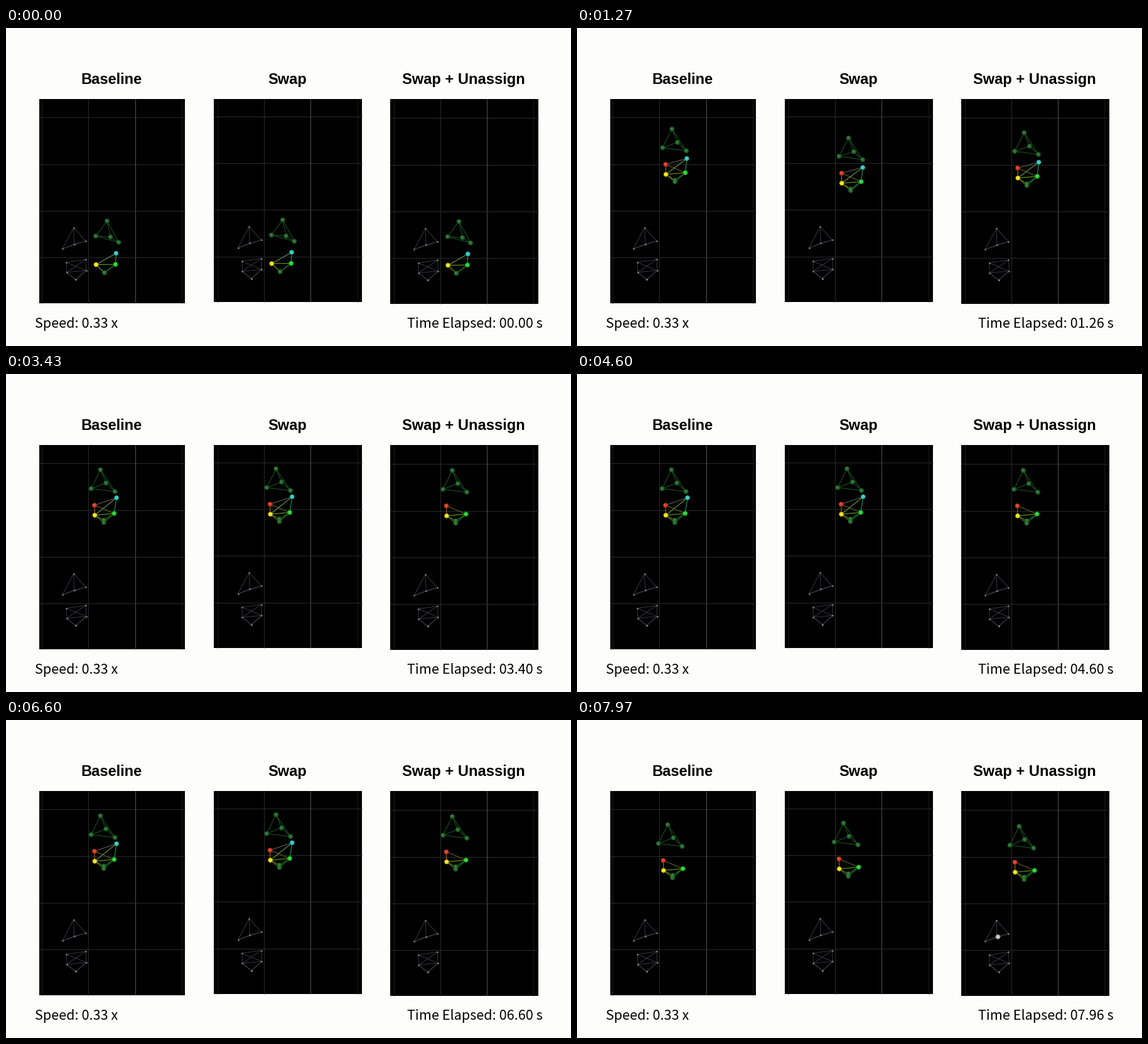
Animation of 900x506 px, one loop 8 s. Source, as a matplotlib script:

```python
from itertools import combinations

import numpy as np
import matplotlib.pyplot as plt
from matplotlib.animation import FuncAnimation
from matplotlib.collections import LineCollection
from matplotlib.patches import Rectangle

W, H, DPI = 900, 506, 128
PT = 72 / DPI
FPS, LOOP = 30, 8000
N = LOOP * FPS // 1000

# Panels: title, box, shift of the scene, duration of the rise, size of the fall
PANELS = [
    ("Baseline", (52.5, 113, 284.5, 437.5), (0, 0), 1475, 1.0),
    ("Swap", (331, 113, 567, 436), (279.7, -1.6), 1690, 0.94),
    ("Swap + Unassign", (612, 113, 847.5, 438.5), (560.5, 1), 1545, 1.12),
]
CELL = 74.3

# Head seen from its apex: apex, left, middle, right
HEAD = np.array([(0, 0), (-18, 24), (5.5, 25.5), (18.5, 34)])
HEAD_TURNED = np.array([(0, 0), (-14.8, 30), (8.8, 21), (23.1, 34.6)])
HEAD_REST = np.array([(0, 0), (-17.9, 33.5), (0.8, 26.2), (19.1, 21.2)])
# Body seen from its yellow node: red, yellow, cyan, green, two dark ones
BODY = np.array([(0.8, -15.9), (0, 0), (31.8, -18), (31, -0.4), (13.4, 12.8), (13.4, 12.8)])
RED, CYAN, UPPER_DARK = 4, 6, 8
EDGES = (list(combinations(range(4), 2)) + list(combinations(range(4, 8), 2))
         + [(a, b) for a in (5, 7) for b in (8, 9)])

DARK = (36, 112, 44)
COLORS = np.array([DARK] * 4 + [(226, 60, 36), (246, 230, 30), (52, 206, 200),
                                (36, 220, 52), DARK, DARK]) / 255

fig = plt.figure(figsize=(W / DPI, H / DPI), dpi=DPI, facecolor="#fdfdfb")
ax = fig.add_axes([0, 0, 1, 1])
ax.set_xlim(0, W)
ax.set_ylim(H, 0)
ax.axis("off")


def ease(t, start, length):
    u = np.clip((t - start) / length, 0, 1)
    return u * u * (3 - 2 * u)


def turn(points, degrees):
    a = np.radians(degrees)
    c, s = np.cos(a), np.sin(a)
    return points @ np.array([(c, s), (-s, c)])


def label(x, y, text, px, font, **style):
    return ax.text(x, y, text, fontsize=px * PT, family=font, va="baseline",
                   color="black", **style)


def rule(xs, ys, shade):
    ax.plot(xs, ys, color=shade, lw=PT, solid_capstyle="butt")


REST = np.vstack([HEAD_REST + (107.7, 317.8), turn(BODY, -4.5) + (96.7, 388.7)])

for title, (x0, y0, x1, y1), (dx, dy), *_ in PANELS:
    ax.add_patch(Rectangle((x0, y0), x1 - x0, y1 - y0, fc="black", lw=0))
    for k in range(4):
        x, y = 57 + k * CELL + dx, 142.3 + k * CELL + dy
        rule([x, x], [y0, y1], ("#1b1b1c", "#2a2a2a", "#52524e", "#1b1b1c")[k])
        rule([x0, x1], [y, y], "#2a2a2d")
    rest = REST + (dx, dy)
    ax.add_collection(LineCollection([rest[list(e)] for e in EDGES],
                                     colors="#3e3e46", linewidths=0.9 * PT))
    ax.scatter(*rest.T, s=(2.6 * PT) ** 2, color="#85857e", lw=0, zorder=3)
    label((x0 + x1) / 2 - 1, 88.5, title, 23.6, "Liberation Sans",
          ha="center", weight="bold")

label(46.5, 477, "Speed: 0.33 x", 21.6, "Noto Sans CJK JP")
clock = label(639, 477, "", 21.6, "Noto Sans CJK JP")


def figure(t, rise_ms, fall):
    """Places of all nodes: a rise, a rest, and the start of a fall."""
    r = ease(t, 0, rise_ms)
    back = fall * max(0, (t - 7470) / 500) ** 2
    head = HEAD + (HEAD_TURNED - HEAD) * r
    head = head + (161 - 10.6 * r ** 1.6 - 6 * back, 307 - 154.6 * r + 14.3 * back)
    body = turn(BODY, -4.5 * r)
    body = body + (143.5 - 2.1 * r * r - 3.6 * back, 376.5 - 151.8 * r + 14.9 * back)
    p = np.vstack([head, body])
    stray = ease(t, 900, 600) - ease(t, 7050, 420)
    p[CYAN] += np.array((4.4, -7.4)) * stray
    p[UPPER_DARK] += np.array((0.2, -4)) * ease(t, 900, 600)
    return p


def shown(t, unassign):
    on = np.ones(len(COLORS), bool)
    on[RED] = t > 200
    on[CYAN] = t < 7700 and not (unassign and 1400 < t < 7150)
    return on


def balls(px, z):
    return ax.scatter([], [], s=(px * PT) ** 2, lw=0, zorder=z)


lines = LineCollection([], linewidths=1.1 * PT, zorder=4)
ax.add_collection(lines)
rims, cores, glints = balls(7.6, 5), balls(5.8, 6), balls(2.2, 7)
WHITE = np.array([(0.8, 0.8, 0.75)])


def draw(n):
    t = n * 1000 / FPS
    segs, seg_cols, pts, cols = [], [], [], []
    for title, _, shift, rise_ms, fall in PANELS:
        unassign = "Unassign" in title
        p = figure(t, rise_ms, fall) + shift
        on = shown(t, unassign)
        for a, b in EDGES:
            if on[a] and on[b]:
                segs.append(p[[a, b]])
                seg_cols.append((COLORS[a] + COLORS[b]) * 0.36)
        pts.append(p[on])
        cols.append(COLORS[on])
        if unassign and t > 7850:
            pts.append(REST[[2]] + shift + (1.5, 0))
            cols.append(WHITE)
    pts, cols = np.vstack(pts), np.vstack(cols)
    lines.set_segments(segs)
    lines.set_color(seg_cols)
    for group, off, shade in ((rims, 0, cols * 0.75), (cores, 0, cols),
                              (glints, -0.8, cols * 0.75 + 0.2)):
        group.set_offsets(pts + off)
        group.set_facecolor(shade)
    s, c = divmod(n * 100 // FPS, 100)
    clock.set_text(f"Time Elapsed: {s:02d}.{c:02d} s")
    return [lines, rims, cores, glints, clock]


anim = FuncAnimation(fig, draw, frames=N, init_func=lambda: draw(0),
                     interval=LOOP / N, repeat=True, repeat_delay=0, blit=False)
plt.show()
```
